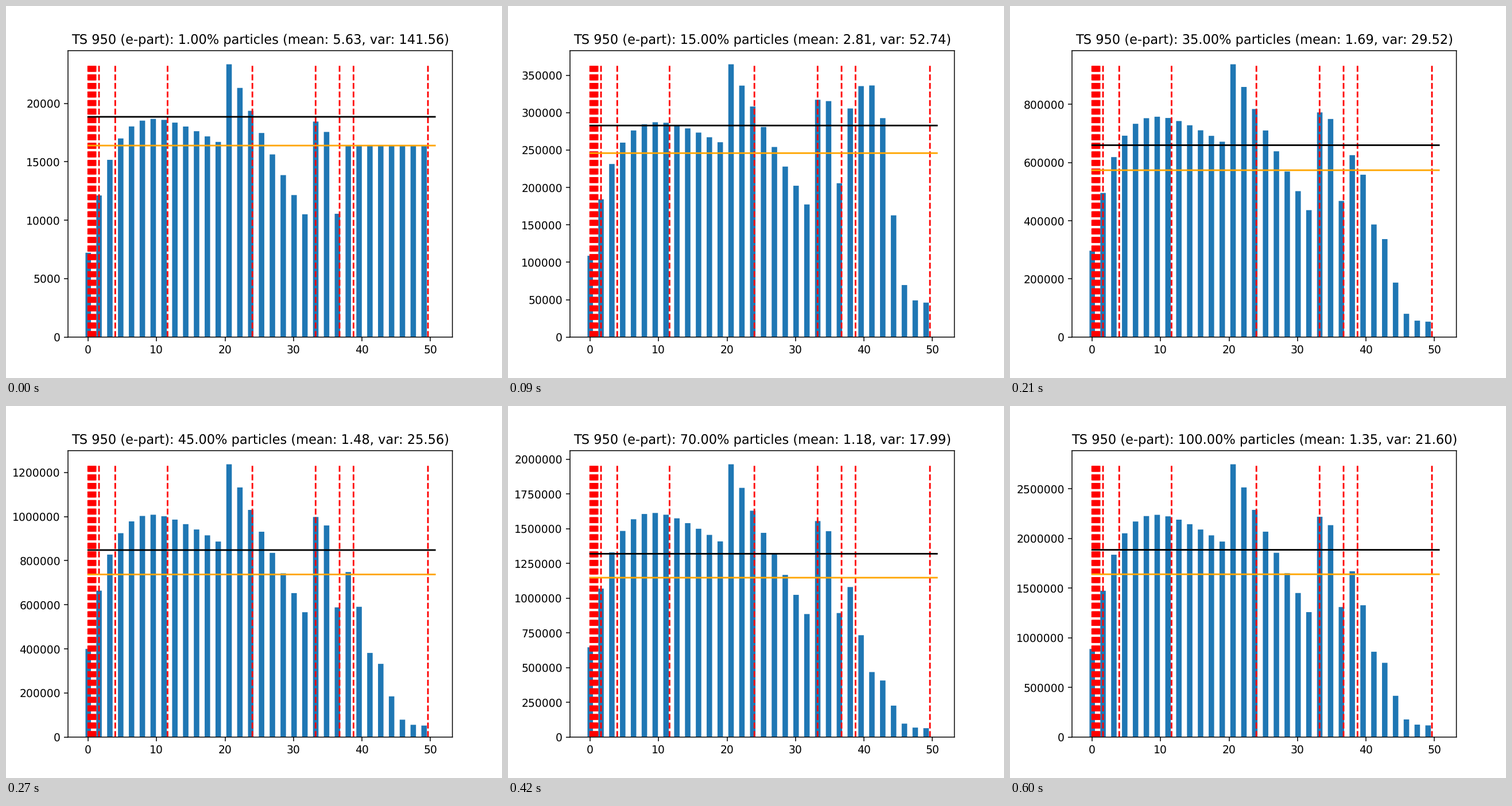
Animation of 864 by 648 pixels, one loop 630 ms. Source, as a matplotlib script:

```python
import numpy as np
import matplotlib.pyplot as plt
from matplotlib.animation import FuncAnimation

# Soft sub-pixel edges instead of snapping to the pixel grid
plt.rcParams.update({"path.snap": False, "text.hinting": "none"})

N_BARS = 32
X_END = 50.68
BAR_WIDTH = 0.8
MEAN_PER_PCT = 16390    # mean bar height for each percent of particles
FILL_END = 15           # percentage at which the last bars are filled
FIRST_LEVEL = 0.702     # their height at the start, relative to the peak

# Key points over the percentage of particles placed
PCT = [1, 15, 25, 45, 60, 85, 100]
MEAN = [5.63, 2.81, 1.94, 1.48, 1.26, 1.07, 1.35]
VAR = [141.56, 52.74, 34.10, 25.56, 19.95, 15.41, 21.60]
SHIFT = [1, 0, 0.37, 0.79, 0.96, 1, 0.78]   # from flat (0) to steep (1)


def mix(a, b, t):
    return np.asarray(a) + (np.asarray(b) - a) * t


def profile(pct):
    """Bar heights relative to the tallest bar."""
    shift = np.interp(pct, PCT, SHIFT)
    start = max(0, (FILL_END - pct) / (FILL_END - 1))

    # Hump: a saturating rise over a slow linear decline
    i = np.arange(13)
    s = shift * (1 - 0.65 * start)
    hump = (mix(0.966, 1.039, s) - mix(0.668, 0.709, s) * np.exp(-i / 2.4)
            - mix(0.0206, 0.0264, s) * i)

    # Slide down from the peak
    j = np.arange(8)
    slide = 1 - mix(0.079, 0.088, shift) * j + mix(0.0008, 0.00135, shift) * j**2

    step = mix([0.87, 0.865, 0.564], [0.79, 0.752, 0.452], shift)

    # Last bars: level at first, then a drop that thins out
    s = 0 if start else shift
    k = np.arange(26, N_BARS)
    drop = 0.125 + 0.82 / (1 + np.exp((k - 27.78) / 0.5))
    tail = np.append(mix([0.838, 0.92], [0.543, 0.36], s), drop * 4.0**-s)
    if start:
        tail = np.minimum(mix(tail, FIRST_LEVEL, start), tail * FILL_END / pct)

    return np.concatenate([hump, slide, step, tail])


def geometric(pct, values):
    return np.exp(np.interp(pct, PCT, np.log(values)))


fig, ax = plt.subplots(figsize=(6.4, 4.8), dpi=135)
bars = ax.bar(np.arange(N_BARS) * X_END / N_BARS, np.ones(N_BARS), BAR_WIDTH,
              color="#1f77b4")

cuts = [*np.linspace(0, 1.08, 10), 1.58, 3.95, 11.6, 24.0, 33.24, 36.74,
        38.78, 49.66]
cut_lines = [ax.plot([x, x], [0, 1], "--", color="red")[0] for x in cuts]
limit_line, = ax.plot([0, X_END], [1, 1], color="black")
mean_line, = ax.plot([0, X_END], [1, 1], color="orange")

left = -BAR_WIDTH / 2
pad = 0.05 * (X_END - left)
ax.set_xlim(left - pad, X_END + pad)
ax.ticklabel_format(axis="y", style="plain", useOffset=False)
title = ax.set_title("")


def update(i):
    pct = max(1, 5 * i)
    level = MEAN_PER_PCT * pct
    shape = profile(pct)
    heights = shape * level / shape.mean()
    top = heights.max()
    for bar, height in zip(bars, heights):
        bar.set_height(height)
    for line in cut_lines:
        line.set_ydata([0, top])
    mean_line.set_ydata([level, level])
    limit_line.set_ydata([1.15 * level, 1.15 * level])
    ax.set_ylim(0, 1.05 * top)
    title.set_text(f"TS 950 (e-part): {pct:.2f}% particles "
                   f"(mean: {geometric(pct, MEAN):.2f}, "
                   f"var: {geometric(pct, VAR):.2f})")
    return [*bars, *cut_lines, limit_line, mean_line, title]


anim = FuncAnimation(fig, update, frames=21, interval=30, repeat=True,
                     repeat_delay=0, blit=False)
plt.show()
```
